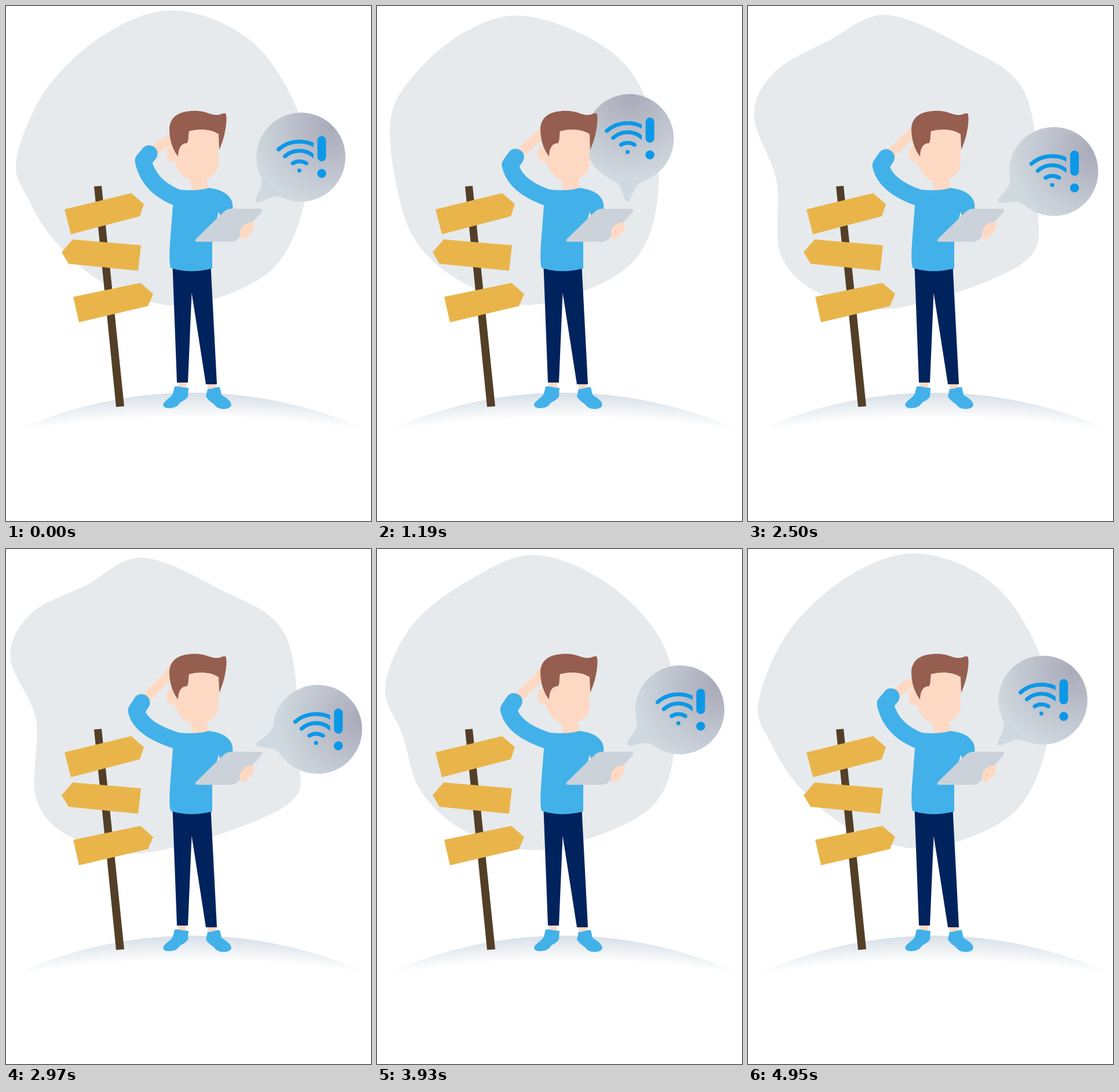
Write an HTML page that moves like this. It is 630x889 px and loops after 5.21 s.

```html
<!DOCTYPE html>
<html lang="en">
<head>
<meta charset="utf-8">
<title>Lost connection</title>
<style>
  html, body { margin: 0; width: 100%; height: 100%; overflow: hidden; background: #fff; }
  svg { display: block; width: 100vw; height: 100vh; }
  .limb { fill: none; stroke-linecap: round; stroke-linejoin: round; }
</style>
</head>
<body>
<svg viewBox="0 0 630 889">
  <defs>
    <radialGradient id="hill" gradientUnits="userSpaceOnUse" cx="325" cy="2700" r="2030">
      <stop offset=".98" stop-color="#fff"/>
      <stop offset="1" stop-color="#d9e1e8"/>
    </radialGradient>
    <radialGradient id="shade" gradientUnits="userSpaceOnUse" cx="0" cy="-182" r="140">
      <stop offset="0" stop-color="#aaaab9"/>
      <stop offset="1" stop-color="#d0d9df"/>
    </radialGradient>
    <clipPath id="cut"><rect x="-60" y="-60" width="81.5" height="120"/></clipPath>
  </defs>

  <path id="blob" fill="#e6eaed"/>
  <path d="M22 731A740 740 0 0 1 624 732Z" fill="url(#hill)"/>

  <path d="M152 311.500L165 310.500L204 691L190 692Z" fill="#533f27"/>
  <g fill="#e9b54b">
    <path d="M101 351L216 323L238 342L231 363L112 394Z"/>
    <path d="M96 425L115 403L233 413L228 457L108 445Z"/>
    <path d="M116 502L232 478L254 497L245 518L126 546Z"/>
  </g>

  <g id="bubble" fill="url(#shade)">
    <path d="M0 -186A77 77 0 0 1 27 -37Q16 -32 13 -25L4 -3Q0 3 -4 -3L-13 -25Q-17 -33 -27 -37A77 77 0 0 1 0 -186Z"/>
  </g>
  <g id="icon" fill="#0c98e8">
    <g clip-path="url(#cut)" class="limb" stroke="#0c98e8" stroke-width="6.800">
      <path d="M-39 -13A55 55 0 0 1 33 -13"/>
      <path d="M-28 -1A37 37 0 0 1 22 -1"/>
      <path d="M-14.500 11A22 22 0 0 1 9 11"/>
    </g>
    <circle cx="-3" cy="23.500" r="3.500"/>
    <rect x="28" y="-36" width="15" height="43.500" rx="7.500"/>
    <circle cx="35.500" cy="28.500" r="7.700"/>
  </g>

  <g fill="#fdd9c4">
    <path id="forearm" class="limb" stroke="#fdd9c4" stroke-width="17"/>
    <ellipse cx="287" cy="255" rx="10" ry="14"/>
    <path d="M290 240L316 205H367V270C367 286 358 293 347 299L350 315Q335 321 320 317L319 302C306 297 296 285 290 266Z"/>
    <path d="M297 648H311V660H297Z"/>
    <path d="M348 650H362V662H348Z"/>
  </g>
  <path d="M297 260C288 248 282 232 282 212C283 190 300 181 326 181C345 181 352 188 363 188C371 188 374 184 379 185.500C383 192 379 225 368 248L367 221C352 211 330 212 316 216C314 225 316 233 312 237C304 236 297 244 297 260Z" fill="#965e4e"/>

  <path d="M287.500 450H353.500L364 653H345L320.500 495L314 650H295Z" fill="#01235d"/>
  <g fill="#43b1e9">
    <path d="M298 317Q330 320 350 314C382 318 394 333 391 352H382L370 363L367 355L362 375L356 405V453Q318 463 284 452Q281 440 283 410L288 345Z"/>
    <path id="sleeve" class="limb" stroke="#43b1e9" stroke-width="29"/>
    <path d="M291 657C296 655 303 659 315 659L314 674C308 683 302 681 297 689C291 695 276 696 272 691C268 683 284 678 288 669Z"/>
    <path d="M348 661C356 662 362 657 369 658L372 671C380 677 388 680 389 689C386 698 368 697 362 691C356 683 352 685 345 674Z"/>
  </g>
  <path d="M388 350H439Q445 351 441 356L400 402Q395 407 388 407H329Q324 406 329 401L374 357Q381 350 388 350Z" fill="#cbd2da"/>
  <path d="M404 388C407 378 420 371 427 374C431 382 425 392 418 396C415 403 407 404 405 400Q403 394 404 388Z" fill="#fdd9c4"/>
</svg>

<script>
const LOOP = 5210;
const PIVOT = [432, 338], REACH = 109.5;
const $ = id => document.getElementById(id);
const mix = (a, b, k) => a + (b - a) * k;
const clamp = x => Math.min(1, Math.max(0, x));

// 0 to 1 along a cosine between two times
const sweep = (t, from, to) => (1 - Math.cos(Math.PI * clamp((t - from) / (to - from)))) / 2;

// cubic-bezier(.25, .1, .25, 1), solved by bisection
function ease(x) {
  if (x <= 0 || x >= 1) return clamp(x);
  const curve = (s, a, b) => 3 * a * s * (1 - s) ** 2 + 3 * b * s * s * (1 - s) + s ** 3;
  let lo = 0, hi = 1;
  for (let i = 0; i < 24; i++) {
    const mid = (lo + hi) / 2;
    if (curve(mid, .25, .25) < x) lo = mid; else hi = mid;
  }
  return curve(lo, .1, 1);
}

// Three poses of the backdrop: outline points clockwise from the top, and the bubble's tilt.
const poses = [
  { tilt: 45, outline: '298,8 425,62 505,185 521,310 462,452 310,516 180,484 90,412 40,336 18,265 72,140 180,43' },
  { tilt: 0, outline: '249,17 385,67 460,155 484,320 435,447 275,515 160,484 75,418 38,330 23,200 58,125 145,48' },
  { tilt: 78, outline: '234,15 365,68 483,149 505,350 483,444 253,523 120,502 52,433 52,293 7,187 43,111 138,63' }
];
for (const p of poses) p.points = p.outline.split(' ').map(s => s.split(',').map(Number));

// Closed Catmull-Rom curve through the points
function smoothPath(points) {
  const n = points.length, at = i => points[(i + n) % n];
  let d = 'M' + at(0);
  for (let i = 0; i < n; i++) {
    const [a, b, c, e] = [at(i - 1), at(i), at(i + 1), at(i + 2)];
    const out = b.map((v, k) => v + (c[k] - a[k]) / 6);
    const into = c.map((v, k) => v - (e[k] - b[k]) / 6);
    d += 'C' + [out, into, c].join(' ');
  }
  return d + 'Z';
}

function drawBackdrop(t) {
  const u = ease(t / 1600) + ease((t - 1750) / 1550) + ease((t - 3290) / 1680);
  const i = Math.min(2, Math.floor(u)), k = u - i;
  const from = poses[i], to = poses[(i + 1) % 3];

  const points = from.points.map((p, j) => p.map((v, c) => mix(v, to.points[j][c], k)));
  $('blob').setAttribute('d', smoothPath(points));

  const tilt = mix(from.tilt, to.tilt, k), rad = tilt * Math.PI / 180;
  const x = PIVOT[0] + REACH * Math.sin(rad), y = PIVOT[1] - REACH * Math.cos(rad);
  $('bubble').setAttribute('transform', `translate(${PIVOT}) rotate(${tilt})`);
  $('icon').setAttribute('transform', `translate(${x} ${y})`);
}

function drawArm(t) {
  const reach = sweep(t, 0, 650) - sweep(t, 750, 1750) + sweep(t, 1750, 3000) - sweep(t, 3530, 4950);
  const joint = (x, y, dx, dy) => [x + dx * reach, y + dy * reach];
  const bend = joint(246, 312, -14, 0);
  const elbow = joint(237, 267, -12, 12);
  const cuff = joint(247, 255, -13, 10);
  const wrist = joint(278, 233, -1, -11);
  const hand = joint(291, 229, -1, -26);
  $('sleeve').setAttribute('d', `M298 332Q${bend} ${elbow}L${cuff}`);
  $('forearm').setAttribute('d', `M${cuff}L${wrist}L${hand}`);
}

function tick() {
  const t = performance.now() % LOOP;
  drawBackdrop(t);
  drawArm(t);
  requestAnimationFrame(tick);
}
tick();
</script>
</body>
</html>
```
